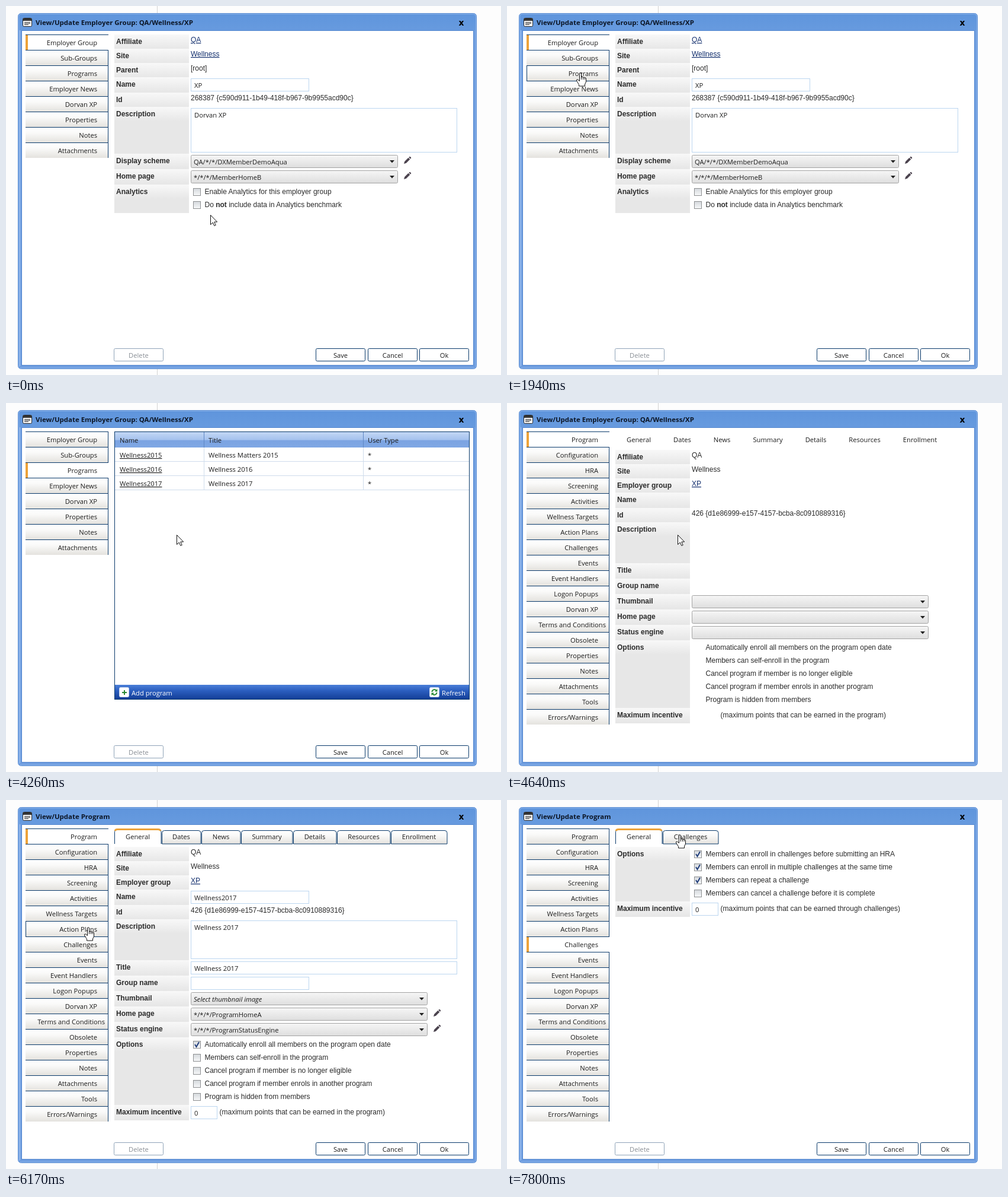
Animation of 836x622 px, one loop 8000 ms. Source, as an HTML page:

```html
<!DOCTYPE html>
<html lang="en">
<head>
<meta charset="utf-8">
<style>
html, body { margin: 0; width: 100%; height: 100%; overflow: hidden; background: #fdfdfd; }
svg { display: block; }
text { font: 12px "Liberation Sans", Arial, sans-serif; fill: #2b2b2b; }
.b { font-weight: bold; }
.ui { font: 11.2px "Open Sans", "Noto Sans", sans-serif; fill: #1c1c1c; }
.title { font: bold 11.45px "Open Sans", "Noto Sans", sans-serif; fill: #0c1626; }
.close { font: bold 14px "DejaVu Sans", sans-serif; fill: #000; }
.it { font-style: italic; }
.link { text-decoration: underline; }
.blue { fill: #14306e; }
.off { fill: #8a8f96; }
.light { fill: #fff; }
.mid { text-anchor: middle; }
.end { text-anchor: end; }
</style>
</head>
<body>
<svg id="stage" width="836" height="622" viewBox="0 0 836 622"></svg>
<script>
const NAVY = '#0a3a6b', FIELD = '#bcd6f0', ORANGE = '#eda33a';
const LOOP = 8000, ROW = 26, TOP = 48;

// Drawing helpers
const text = (x, y, s, cls = '') => `<text x="${x}" y="${y}" class="${cls}">${s}</text>`;
const fill = (x, y, w, h, c) => `<rect x="${x}" y="${y}" width="${w}" height="${h}" fill="${c}"/>`;
const box = (x, y, w, h, c, line, r = 0) =>
  `<rect x="${x + .5}" y="${y + .5}" width="${w - 1}" height="${h - 1}" rx="${r}" fill="${c}" stroke="${line}"/>`;
const path = (d, c, extra = '') => `<path d="${d}" fill="${c}" ${extra}/>`;
const group = (id, s) => `<g id="${id}">${s}</g>`;
const gradient = (id, ...stops) => `<linearGradient id="${id}" x2="0" y2="1">` +
  stops.map(([o, c]) => `<stop offset="${o}" stop-color="${c}"/>`).join('') + '</linearGradient>';

const sidebar = (items, selected) => items.map((s, i) => {
  const y = TOP + i * ROW, on = i === selected;
  return fill(33, y + 1, 140, 25, on ? '#fff' : 'url(#item)') +
    fill(33, y, 140, 1, NAVY) +
    (on ? fill(33, y + 1, 4, 25, ORANGE) : fill(172, y, 1, ROW, NAVY)) +
    text(s.length > 18 ? 167 : 154, y + 18, s, 'ui end');
}).join('');

const labels = (y, rows) => rows.map(([s, h]) => {
  const out = fill(183, y, 126, h, '#e7e7e7') + fill(183, y, 126, 24, 'url(#label)') +
    text(186, y + 16, s, 'b');
  y += h;
  return out;
}).join('');

const input = (y, w, s = '', h = 22) =>
  box(312, y, w, h, '#fff', FIELD) + text(318, y + 16, s, 'ui');
const select = (y, w) => box(312, y, w, 22, 'url(#select)', '#a3a3a3', 2) +
  path(`M${308 + w - 10} ${y + 9}h8l-4 4.5z`, '#222');
const choice = (y, s, cls = '') => text(317, y + 16, s, 'ui ' + cls);
const pencil = (x, y) => path(
  `M${x - 6} ${y + 6}l1.2-4 6.3-6.3 2.8 2.8-6.3 6.3zM${x + 2.3} ${y - 5.1}l1.5-1.2q2.3 .6 2.5 2.6l-1.3 1.4z`, '#4c444f');
const check = (y, on) => box(316, y - 6, 13, 13, 'url(#check)', '#8d8f91') +
  (on ? path(`M319 ${y}l2.5 4 4.5-8`, 'none', 'stroke="#24407c" stroke-width="2"') : '');
const option = (y, s) => text(335.5, y + 4, s);

const tabBoxes = (edges, selected = 0) => edges.slice(0, -1).map((x, i) => {
  const w = edges[i + 1] - x - 1, on = i === selected, y = on ? 49.5 : 51.5;
  const shape = `M${x + .5} 74V${y + 4}q0-4 4-4H${x + w - 4}q4 0 4 4V74`;
  return path(shape + (on ? '' : 'z'), on ? '#fff' : 'url(#item)', `stroke="${NAVY}"`) +
    (on ? path(`M${x + 1} 52q1-2.5 4-2.5H${x + w - 5}q3 0 4 2.5`, 'none', `stroke="${ORANGE}" stroke-width="3"`) : '');
}).join('');
const tabNames = (edges, names) => names.map((s, i) =>
  text((edges[i] + edges[i + 1]) / 2 - .5, 66, s, 'ui mid')).join('');

const button = (x, s, off) => box(x, 577, 84, 22, '#fff', off ? '#8fa3b8' : NAVY, 2) +
  text(x + 42, 593, s, 'ui mid' + (off ? ' off' : ''));

// Content
const groupItems = ['Employer Group', 'Sub-Groups', 'Programs', 'Employer News', 'Dorvan XP',
  'Properties', 'Notes', 'Attachments'];
const programItems = ['Program', 'Configuration', 'HRA', 'Screening', 'Activities', 'Wellness Targets',
  'Action Plans', 'Challenges', 'Events', 'Event Handlers', 'Logon Popups', 'Dorvan XP',
  'Terms and Conditions', 'Obsolete', 'Properties', 'Notes', 'Attachments', 'Tools', 'Errors/Warnings'];
const programTabs = [183, 263, 330, 397, 485, 559, 650, 746], challengeTabs = [183, 263, 358];

const defs = '<defs>' +
  gradient('bar', [0, '#5f95dc'], [.15, '#79a7e5'], [1, '#b9d3f5']) +
  gradient('item', [0, '#fff'], [.35, '#fafaf9'], [1, '#e4e2de']) +
  gradient('label', [0, '#f8f8f8'], [1, '#e7e7e7']) +
  gradient('select', [0, '#f6f6f6'], [1, '#dedede']) +
  gradient('check', [0, '#d5d9dd'], [1, '#f7f8f9']) +
  gradient('head', [0, '#c3d7f4'], [.5, '#a5c2ee'], [.55, '#7ba3e2'], [1, '#7fa7e4']) +
  gradient('foot', [0, '#4b7fd8'], [.4, '#2c5fc0'], [1, '#143f98']) + '</defs>';

const frame = fill(255, 0, 1, 622, '#d2d2d2') +
  box(20, 12, 775, 600, '#77a4e3', '#4f85cf', 5) +
  box(21, 13, 773, 598, 'url(#bar)', '#8fb6ec', 4) +
  fill(22, 41, 771, 569, '#6f9ee0') + fill(23, 41, 1, 566, '#a4c4f1') +
  box(26, 41, 764, 565, '#fff', '#5487cf') +
  box(28, 20, 16, 15, '#fff', '#222', 2) + fill(29, 21, 14, 4, '#333') +
  [27, 29, 31].map(y => fill(31, y, y > 30 ? 7 : 10, 1, '#333')).join('') +
  '<text id="title" x="50" y="32" class="title"></text>' + text(764.5, 33, 'x', 'close');

const employerView = sidebar(groupItems, 0) +
  labels(48, [['Affiliate', 24], ['Site', 24], ['Parent', 24], ['Name', 26], ['Id', 24],
    ['Description', 79], ['Display scheme', 26], ['Home page', 26], ['Analytics', 48]]) +
  text(312, 61, 'QA', 'link blue') + text(312, 85, 'Wellness', 'link blue') + text(312, 109, '[root]') +
  input(122, 200, 'XP') + text(312, 159, '268387 {c590d911-1b49-418f-b967-9b9955acd90c}') +
  input(172, 450, 'Dorvan XP', 75) +
  select(251, 350) + choice(251, 'QA/*/*/DXMemberDemoAqua') + pencil(678, 260) +
  select(277, 350) + choice(277, '*/*/*/MemberHomeB') + pencil(678, 286) +
  check(313) + option(313, 'Enable Analytics for this employer group') +
  check(335) + option(335, 'Do <tspan class="b">not</tspan> include data in Analytics benchmark');

const listRows = [['Wellness2015', 'Wellness Matters 2015'], ['Wellness2016', 'Wellness 2016'],
  ['Wellness2017', 'Wellness 2017']];
const listView = sidebar(groupItems, 2) +
  box(183, 48, 600, 452, '#fff', NAVY) + fill(184, 49, 598, 26, 'url(#head)') +
  fill(334, 49, 1, 26, '#5f87c4') + fill(603, 49, 1, 26, '#5f87c4') +
  text(192, 67, 'Name', 'ui') + text(342, 67, 'Title', 'ui') + text(611, 67, 'User Type', 'ui') +
  listRows.map(([name, title], i) => {
    const y = 75 + i * 24;
    return fill(184, y + 23, 598, 1, '#cfdcec') + fill(334, y, 1, 24, '#cfdcec') + fill(603, y, 1, 24, '#cfdcec') +
      text(192, y + 17, name, 'ui link') + text(342, y + 17, title, 'ui') + text(611, y + 17, '*', 'ui');
  }).join('') +
  fill(184, 475, 598, 24, 'url(#foot)') +
  box(191, 479, 17, 17, '#fff', '#c9d6ee', 2) + fill(196, 487, 8, 2, '#2b8a35') + fill(199, 484, 2, 8, '#2b8a35') +
  text(212, 493, 'Add program', 'ui light') +
  box(715, 479, 17, 17, '#fff', '#c9d6ee', 2) +
  path('M719.5 487a4 4 0 0 1 7-2.5M727.5 488a4 4 0 0 1-7 2.5', 'none', 'stroke="#2b8a35" stroke-width="2"') +
  path('M728.5 482v4.5h-4.5zM718.5 493v-4.5h4.5z', '#2b8a35') +
  text(736, 493, 'Refresh', 'ui light');

const programOptions = ['Automatically enroll all members on the program open date',
  'Members can self-enroll in the program', 'Cancel program if member is no longer eligible',
  'Cancel program if member enrols in another program', 'Program is hidden from members'];
const programView = sidebar(programItems, 0) +
  labels(79, [['Affiliate', 24], ['Site', 24], ['Employer group', 24], ['Name', 26], ['Id', 24],
    ['Description', 69], ['Title', 26], ['Group name', 26], ['Thumbnail', 26], ['Home page', 26],
    ['Status engine', 26], ['Options', 114], ['Maximum incentive', 26]]) +
  group('widgets', tabBoxes(programTabs) + programOptions.map((s, i) => check(412 + i * 22, !i)).join('')) +
  tabNames(programTabs, ['General', 'Dates', 'News', 'Summary', 'Details', 'Resources', 'Enrollment']) +
  text(312, 92, 'QA') + text(312, 116, 'Wellness') + text(312, 140, 'XP', 'link blue') +
  text(312, 190, '426 {d1e86999-e157-4157-bcba-8c0910889316}') +
  select(324, 400) + select(350, 400) + select(376, 400) +
  programOptions.map((s, i) => option(412 + i * 22, s)).join('') +
  text(360.5, 530, '(maximum points that can be earned in the program)') +
  group('values', input(153, 200, 'Wellness2017') + input(203, 450, 'Wellness 2017', 65) +
    input(272, 450, 'Wellness 2017') + input(298, 200) + input(516, 45, '0') +
    choice(324, 'Select thumbnail image', 'it') + choice(350, '*/*/*/ProgramHomeA') +
    choice(376, '*/*/*/ProgramStatusEngine') + pencil(728, 359) + pencil(728, 385));

const challengeOptions = ['Members can enroll in challenges before submitting an HRA',
  'Members can enroll in multiple challenges at the same time', 'Members can repeat a challenge',
  'Members can cancel a challenge before it is complete'];
const challengeView = sidebar(programItems, 7) + tabBoxes(challengeTabs) +
  tabNames(challengeTabs, ['General', 'Challenges']) +
  labels(79, [['Options', 92], ['Maximum incentive', 26]]) +
  challengeOptions.map((s, i) => check(91 + i * 22, i < 3) + option(91 + i * 22, s)).join('') +
  input(173, 45, '0') + text(360.5, 187, '(maximum points that can be earned through challenges)');

const outline = 'stroke="#111" stroke-linejoin="round"';
const arrow = path('M.5 .5V16.5L4.3 13 6.8 18.5 9.2 17.5 6.8 12H11.7z', '#fff', outline);
const hand = path('M-1.5 1.5q1.5-1.5 3 0V8q1.5-1 3 .3 1.5-.9 2.7 .5 1.8-.5 2.3 1.2V16l-2 4v3H-2.5v-2.5L-6.5 14q-.3-2.5 1.8-2l3.2 2.5z',
  '#fff', outline) + path('M1.5 8v4M4.5 8.5V12M7.2 9v3', 'none', outline);

const stage = document.getElementById('stage');
stage.innerHTML = defs + frame + group('employer', employerView) + group('list', listView) +
  group('program', programView) + group('challenge', challengeView) +
  group('buttons', button(182, 'Delete', true) + button(523, 'Save') + button(611, 'Cancel') + button(698, 'Ok')) +
  group('hover', fill(33, 0, 1, 25, NAVY)) + group('arrow', arrow) + group('hand', hand);

// Pointer moves: start, end, number of steps, points after the current one
const moves = [
  [1090, 1630, 8, [136, 94]],
  [1780, 1940, 3, [124, 112]],
  [3020, 3250, 4, [220, 142]],
  [3420, 3490, 2, [220, 134]],
  [3880, 4260, 6, [288, 222]],
  [5260, 5410, 3, [177, 167]],
  [5490, 5630, 3, [146, 143]],
  [5860, 6250, 6, [137, 239]],
  [7180, 7800, 9, [190, 232], [292, 58]]
];
const ease = p => p * p * (3 - 2 * p);

function pointer(t) {
  let at = [345, 352];
  for (const [start, end, steps, ...points] of moves) {
    if (t < start) break;
    const done = Math.min(steps, Math.floor((t - start) / (end - start) * (steps - 1) + 1e-6) + 1);
    const route = [at, ...points], s = ease(done / steps) * points.length;
    const i = Math.min(points.length - 1, Math.floor(s));
    at = route[i].map((v, k) => Math.round(v + (route[i + 1][k] - v) * (s - i)));
  }
  return at;
}

const el = id => document.getElementById(id);
const show = (id, on) => el(id).style.display = on ? '' : 'none';

function render(t) {
  const view = t < 2560 ? 'employer' : t < 4360 ? 'list' : t < 4640 ? 'blank' : t < 6650 ? 'program' : 'challenge';
  for (const v of ['employer', 'list', 'program', 'challenge']) show(v, v === view);
  show('widgets', t >= 4720);
  show('values', t >= 5180);
  show('buttons', t < 4360 || t >= 5180);
  el('title').textContent = 'View/Update ' + (t < 5490 ? 'Employer Group: QA/Wellness/XP' : 'Program');

  const [x, y] = pointer(t);
  const row = Math.floor((y - TOP) / ROW);
  const selected = { employer: 0, list: 2, program: 0, challenge: 7 }[view];
  const count = t < 4360 ? groupItems.length : programItems.length;
  const onItem = x >= 33 && x < 173 && row >= 0 && row < count;
  const onLink = view === 'list' && t < 3650 && x > 190 && x < 264 && y > 122 && y < 147;
  const onTab = view === 'challenge' && x > 262 && x < 358 && y > 50 && y < 75;
  const isHand = onItem || onLink || onTab;

  show('hover', onItem && row !== selected);
  el('hover').setAttribute('transform', `translate(0 ${TOP + row * ROW + 1})`);
  show('hand', isHand);
  show('arrow', !isHand);
  el(isHand ? 'hand' : 'arrow').setAttribute('transform', `translate(${x} ${y})`);
}

const began = performance.now();
function tick() {
  render((performance.now() - began) % LOOP);
  requestAnimationFrame(tick);
}
tick();
</script>
</body>
</html>
```
